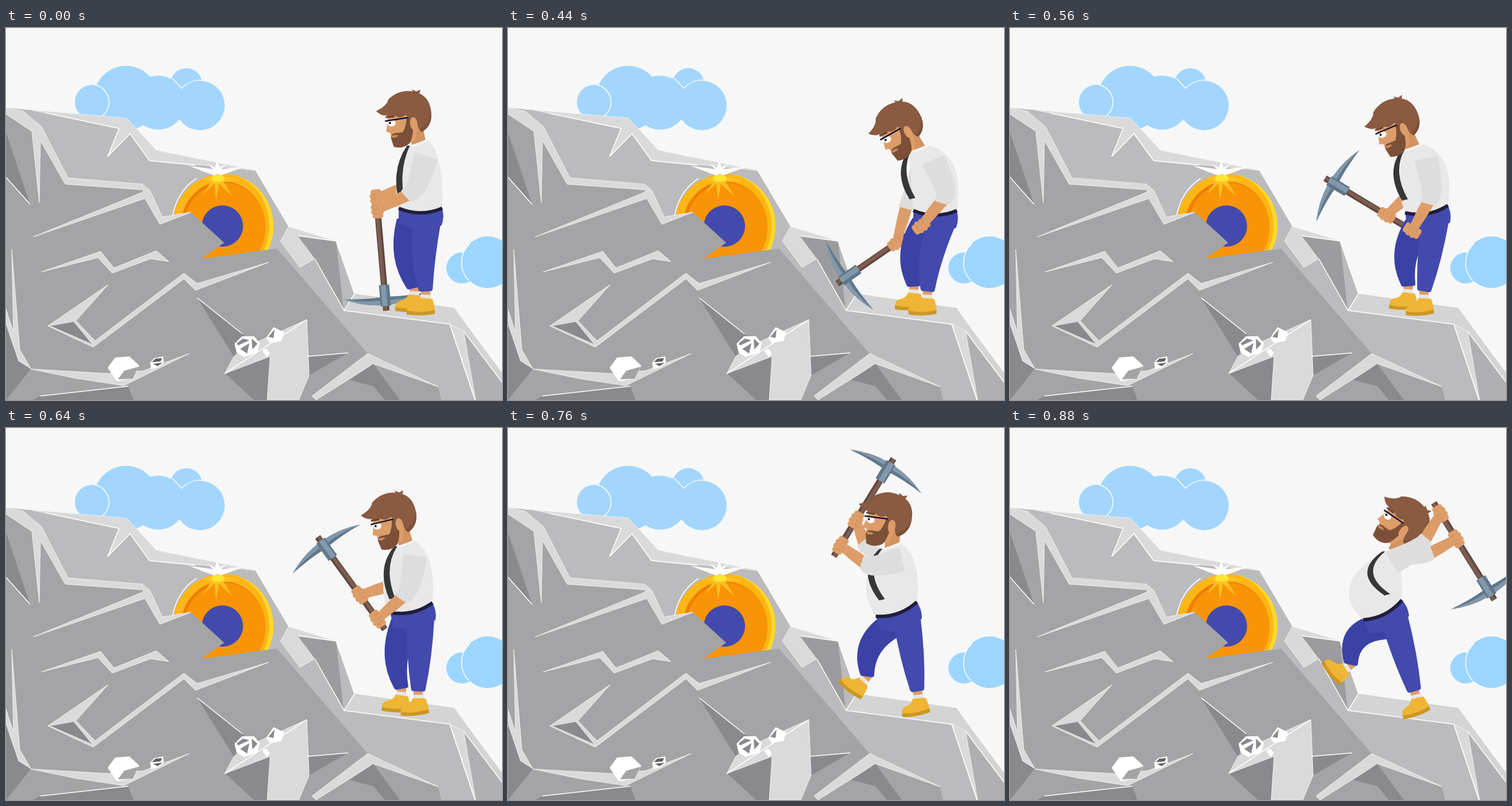
An HTML page for the animation above (960 ms loop, 864x648 px).

```html
<!DOCTYPE html>
<html lang="en">
<head>
<meta charset="utf-8">
<title>Miner</title>
<style>
html, body { margin: 0; width: 100%; height: 100%; overflow: hidden; background: #f7f7f7 }
svg { display: block; width: 864px; height: 648px }
.light { fill: #dadadb; stroke: #efeff0; stroke-width: 1 }
.mid { fill: #a4a4a6 }
.dark { fill: #8a898e }
.edge { fill: none; stroke: #fff; stroke-width: 1.5 }
.limb { stroke-width: 8; stroke-linejoin: round }
.near { fill: #434aad; stroke: #434aad }
.far { fill: #3a42a5; stroke: #3a42a5 }
.skin { fill: #dd9d69; stroke: #dd9d69 }
.sleeve { fill: #dddddd; stroke: #dddddd }
</style>
</head>
<body>
<svg viewBox="0 0 864 648">
  <defs>
    <g id="fist" fill="none" stroke-linecap="round">
      <path d="M-11-5V5M-4-7V7M4-7V7M11-5V5" stroke="#dd9d69" stroke-width="9"/>
      <path d="M-7.5-8V0M0-9V0M7.5-8V0" stroke="#c98a58"/>
    </g>
    <g id="shoe">
      <path d="M-8-5H8V8H-8Z" fill="#dd9d69"/>
      <path d="M-9 4 9 5V13H-9Z" fill="#e6e6e6"/>
      <path d="M-10 10 12 12Q16 24 16 35L-32 36Q-35 25-24 21Q-14 20-10 10Z" fill="#efb534"/>
      <path d="M-33 32Q-12 38 16 31V38Q-8 43-33 39Z" fill="#cc9724"/>
    </g>
  </defs>

  <g fill="#a2d6fe">
    <circle cx="209" cy="122" r="56"/><circle cx="314" cy="98" r="28"/>
    <circle cx="265" cy="130" r="47"/><circle cx="338" cy="135" r="43"/>
    <circle cx="150" cy="129" r="30"/>
  </g>
  <g fill="#9cd5ff"><circle cx="794" cy="418" r="27"/><circle cx="839" cy="408" r="45"/></g>
  <path class="edge" d="M155 99A31 31 0 0 1 167 154M290 88 306 105A44 44 0 0 1 342 91M808 376A45 45 0 0 0 806 440"/>

  <path d="M0 139 45 143 210 157 262 213 434 248 492 346 575 371 607 463 781 488 804 520 864 601V648H0Z" fill="#bbbbbd"/>
  <path class="light" d="M45 143 210 157 262 213 434 248 380 242 250 231 216 184 177 224 197 175Z"/>
  <path class="edge" d="M70 148 197 175 177 224 216 184 250 231 330 239"/>

  <ellipse cx="378" cy="345" rx="88" ry="91" fill="#fdb614"/>
  <path d="M378 254A88 91 0 0 1 378 436A73 82 0 0 0 378 254Z" fill="#ffd92c"/>
  <ellipse cx="378" cy="347" rx="74" ry="80" fill="#ee7d08"/>
  <ellipse cx="381" cy="347" rx="71" ry="77" fill="#f99406"/>
  <circle cx="377" cy="345" r="36" fill="#434aad"/>
  <path class="edge" d="M290 328Q298 284 332 262"/>
  <path d="M318 240 361 246 351 237 364 243 368 231 372 243 384 237 375 246 418 241 368 259Z" fill="#fff"/>
  <path d="M340 263 362 258 369 254 376 258 410 266 379 268 394 293 371 271 366 300 363 271 343 290 358 267Z" fill="#ffc01f"/>
  <ellipse cx="369" cy="262" rx="12" ry="6" fill="#ffe52e"/>

  <path class="mid" d="M0 145 50 175 105 265 243 280 268 336 322 321 380 374 340 402 472 384 630 567 640 585 753 625 758 648H0Z"/>
  <path class="light" d="M0 139 30 145 62 172 108 261 238 272 251 283 272 329 322 321 268 342 242 297 47 364 238 286 240 282 103 272 60 196 58 304 45 180 0 150Z"/>
  <path class="dark" d="M0 182 42 307 0 262ZM0 515 22 580 43 594 0 648ZM47 648 60 641 213 624 222 648Z"/>
  <path class="edge" d="M0 260 42 307M60 641 213 624"/>
  <path class="light" d="M10 386 24 560 43 593 22 580 0 515V490L13 530Z"/>
  <path class="light" d="M61 425 165 389 188 418 262 388 284 407 252 402 185 427 160 400Z"/>
  <path class="light" d="M73 519 178 447 122 510 155 545 310 427 333 445 458 408 330 457 310 437 152 556Z"/>
  <path class="dark" d="M78 519 118 512 149 550ZM333 470 415 535 397 573ZM382 602 461 572 455 648H432ZM525 572 596 566 528 605Z"/>
  <path class="light" d="M43 594 180 602 240 597 319 567 205 623 120 610Z"/>
  <path class="light" d="M381 602 397 572 435 548 524 508 528 605 510 648H455L460 572Z"/>
  <path class="edge" d="M333 470 412 533M525 572 596 566M381 602 524 508"/>
  <path class="light" d="M630 567 753 625 640 585 540 648 533 641Z"/>
  <path class="dark" d="M640 585 598 613 640 624 660 648H686Z"/>

  <path class="light" d="M492 346 575 371 508 362 538 402 512 417 478 371Z"/>
  <path d="M508 362 575 372 588 490 538 402Z" fill="#9c9c9e"/>
  <path d="M607 463 781 488 804 520 864 601V618L797 527 773 516 589 492Z" fill="#d4d4d5"/>
  <path d="M797 528 864 617V648H818Z" fill="#b0b0b2"/>
  <path class="light" d="M773 516 797 527 818 648Z"/>
  <path class="edge" d="M508 362 575 371 607 463 589 492 538 402M589 492 773 516 817 648M797 528 864 617"/>

  <path d="M177 592 190 574 215 572 232 588 222 611 193 615ZM251 583 258 575 274 572 275 583 266 591 253 594ZM398 550 411 537 432 537 442 549 438 565 415 573 402 566ZM453 540 466 521 484 530 480 545 460 549ZM446 562 453 558 460 567 454 573Z" fill="#fff"/>
  <path d="M231 590 221 611 195 612 206 597Z" fill="#a4a4a6"/>
  <path d="M254 582 260 576 272 575 269 581ZM256 585 273 583 264 589Z" fill="#626165"/>
  <path class="dark" d="M402 549 413 541 424 544 404 553ZM428 541 438 550 429 560ZM408 559 424 549 420 567ZM457 538 468 525 466 540Z"/>

  <g id="axe">
    <path d="M-22 0H177" stroke="#62473f" stroke-width="11"/>
    <path d="M-22-1H177" stroke="#7c5d52" stroke-width="6"/>
    <path d="M-12 8Q-11 40 4 73Q0 35 2 8ZM-12-8Q-11-40 4-73Q0-35 2-8Z" fill="#62778a"/>
    <path d="M-12 8Q-11 40 4 73Q-5 40-4 8ZM-12-8Q-11-40 4-73Q-5-40-4-8Z" fill="#8298ab"/>
    <path d="M-14-9H23V9H-14Z" fill="#62778a"/>
    <path d="M-14-6H23V3H-14Z" fill="#8298ab"/>
  </g>
  <path id="farForearm" class="limb skin"/>
  <use id="farHand" href="#fist"/>
  <path id="farSleeve" class="limb sleeve"/>
  <use id="farShoe" href="#shoe"/>
  <path id="farLeg" class="limb far"/>
  <use id="nearShoe" href="#shoe"/>
  <path id="nearLeg" class="limb near"/>
  <path id="pelvis" class="near" d="M-37 0H37Q42 14 36 30L-10 36-38 26Z"/>
  <path id="neck" stroke="#d39360" stroke-width="25"/>
  <path id="torso" fill="#e8e8e8"/>
  <path id="collar" fill="none" stroke="#f3f3f3" stroke-width="4"/>
  <path id="belt" d="M-38 0Q0 16 38 0" fill="none" stroke="#221d3c" stroke-width="6"/>
  <path id="tie" fill="#363838"/>
  <g id="head">
    <path class="skin" d="M-40-22-42-8-47 8-40 11V20L-36 34 0 30 10 0 0-30Z"/>
    <path d="M-9-12 2-10Q0 20-9 33Q-22 43-38 36L-41 19Q-38 11-30 13H-19Q-11 3-9-12Z" fill="#7c5038"/>
    <path d="M-40 17Q-33 14-27 18Q-33 22-40 19Z" fill="#c98a58"/>
    <path d="M-60-30Q-40-36-36-47Q-16-62 8-55L7-59 14-54 22-56 19-50Q36-40 35-14Q33 10 14 17Q8 14 7-8L-2-8-10-16Q-20-10-28-17Q-38-14-44-20Q-52-20-60-30Z" fill="#8a5a41"/>
    <path d="M35-14Q33 10 14 17L11 12Q30 4 35-14Z" fill="#7c5038"/>
    <ellipse class="skin" cx="2" cy="1" rx="6" ry="11"/>
    <ellipse cx="-36" cy="-5" rx="7" ry="5.500" fill="#fff"/>
    <circle cx="-39" cy="-6" r="2" fill="#222"/>
    <path d="M-45-17-30-16" stroke="#6b432f" stroke-width="3"/>
    <path d="M-47-10.500-6-11" stroke="#17152b" stroke-width="2.500"/>
  </g>
  <path id="nearForearm" class="limb skin"/>
  <use id="nearHand" href="#fist"/>
  <path id="nearSleeve" class="limb sleeve"/>
</svg>
<script>
// neck, hip: x, y. grip: near hand x, y and axe angle. feet: near x, then far x, y. tilt: head.
const poses = [
  { at: 0, neck: [718, 200], hip: [722, 314], tilt: [-8], grip: [647, 316, -95], feet: [731, 711, 454] },
  { at: 400, neck: [724, 206], hip: [743, 318], tilt: [-26], grip: [685, 317, -77], feet: [737, 715, 456] },
  { at: 480, neck: [708, 213], hip: [745, 318], tilt: [-32], grip: [754, 373, 8], feet: [724, 699, 446] },
  { at: 640, neck: [696, 201], hip: [706, 313], tilt: [-13], grip: [647, 333, 54], feet: [718, 689, 455] },
  { at: 720, neck: [677, 203], hip: [686, 315], tilt: [0], grip: [575, 265, 93], feet: [716, 653, 448] },
  { at: 800, neck: [656, 208], hip: [667, 316], tilt: [16], grip: [583, 144, 150], feet: [711, 597, 418] },
  { at: 880, neck: [668, 210], hip: [649, 317], tilt: [35], grip: [750, 149, 238], feet: [705, 593, 412] },
];

const $ = id => document.getElementById(id);
const clamp = (v, low, high) => Math.max(low, Math.min(high, v));
const lerp = (a, b, k) => a.map((v, i) => v + (b[i] - v) * k);
const add = (a, b, k = 1) => [a[0] + b[0] * k, a[1] + b[1] * k];
const draw = (id, d) => $(id).setAttribute('d', d);
const place = (id, [x, y], angle, shift = 0) =>
  $(id).setAttribute('transform', `translate(${x} ${y}) rotate(${angle}) translate(${shift} 0)`);

function turn([x, y], degrees) {
  const r = degrees * Math.PI / 180, c = Math.cos(r), s = Math.sin(r);
  return [x * c - y * s, x * s + y * c];
}

// Half of a width, square to the line from a to b
function side(a, b, width) {
  const dx = b[0] - a[0], dy = b[1] - a[1], k = width / 2 / (Math.hypot(dx, dy) || 1);
  return [-dy * k, dx * k];
}

// Curve from a to b that passes through m halfway
const through = (a, m, b) => `Q${add(add(m, m), lerp(a, b, .5), -1)} ${b}`;

// Joint between a and b: sticks out more the closer they are
function joint(a, b, part, length, bend) {
  const slack = Math.sqrt(Math.max(0, length ** 2 - Math.hypot(b[0] - a[0], b[1] - a[1]) ** 2)) / 2;
  return add(lerp(a, b, part), side(a, b, 2), -slack * bend);
}

function limb(id, a, b, c, wa, wb, wc) {
  const na = side(a, b, wa), nb = side(a, c, wb), nc = side(b, c, wc);
  const edge = k => [add(a, na, k), add(b, nb, k), add(c, nc, k)];
  const left = edge(1), right = edge(-1).reverse();
  draw(id, `M${left[0]}${through(...left)}L${right[0]}${through(...right)}Z`);
}

function arm(name, shoulder, hand, angle, bend, width) {
  const elbow = joint(shoulder, hand, .45, 133, bend), cuff = lerp(elbow, hand, .2);
  limb(name + 'Forearm', elbow, lerp(elbow, hand, .5), hand, 14, 12, 7);
  limb(name + 'Sleeve', shoulder, lerp(elbow, shoulder, .15), cuff, width, width * .6 + 6, 18);
  place(name + 'Hand', hand, angle);
}

function leg(name, hip, ankle, angle) {
  const knee = joint(hip, ankle, .5, 128, -.4);
  limb(name + 'Leg', hip, knee, lerp(knee, ankle, .92), 40, 33, 17);
  place(name + 'Shoe', ankle, angle);
}

function frame(now) {
  const t = Math.floor(now % 960 / 40) * 40;
  const i = poses.filter(pose => pose.at <= t).length - 1;
  const from = poses[i], to = poses[i + 1];
  const k = i && to ? (t - from.at) / (to.at - from.at) : 0;
  const mix = key => k ? lerp(from[key], to[key], k) : from[key];

  const neck = mix('neck'), hip = mix('hip'), grip = mix('grip'), [tilt] = mix('tilt');
  const [nearX, farX, farY] = mix('feet'), angle = grip[2];
  const swing = Math.max(0, angle) / 238, rise = Math.sqrt(swing);
  const lean = -27 * rise;
  const onHips = point => add(hip, turn(point, lean));

  const throat = add(neck, [-17, 5]), nape = add(neck, [17, -5]);
  const buckle = onHips([-38, 0]), belt = onHips([38, 0]);
  const belly = add(hip, [-41 - 16 * rise, -43]), spine = add(hip, [33, -77]);
  draw('torso', `M${throat}${through(throat, belly, buckle)}Q${onHips([0, 16])} ${belt}${through(belt, spine, nape)}Z`);
  draw('collar', `M${add(throat, [4, 2])}L${nape}`);
  place('belt', hip, lean);
  place('pelvis', hip, lean);

  const tieEnd = add(lerp(throat, buckle, .8), [35, -20], swing ** 2);
  const tieBend = add(throat, [-22 - 28 * swing, 38]);
  const tieEdge = w => [add(throat, [w / 2, 0]), add(tieBend, [w * 1.3, 0]), add(tieEnd, [w, -w / 4])];
  const [a, b, c] = tieEdge(-5), [d, e, f] = tieEdge(5);
  draw('tie', `M${a}Q${b} ${c}L${f}Q${e} ${d}Z`);

  leg('near', onHips([12, 20]), [nearX, 460], -18 * swing);
  leg('far', onHips([-18, 24]), [farX, farY], Math.max(0, nearX - farX - 25) * .6);

  const ear = add(neck, turn([-5, -35], tilt));
  place('head', ear, tilt);
  draw('neck', `M${add(ear, [5, 4])}L${add(neck, [2, 6])}`);

  // Hands meet at the handle's end at rest and spread out for the swing
  const gap = clamp((angle + 80) * 1.3, -20, 52), bend = 1 - 1.5 * swing ** 2;
  place('axe', grip, angle, -155);
  arm('near', add(lerp(throat, spine, .55), [0, 4]), grip, angle, bend, 34);
  arm('far', add(neck, [0, 20]), add(grip, turn([-gap, 0], angle)), angle, bend * .7, 14);
  requestAnimationFrame(frame);
}
requestAnimationFrame(frame);
</script>
</body>
</html>
```
